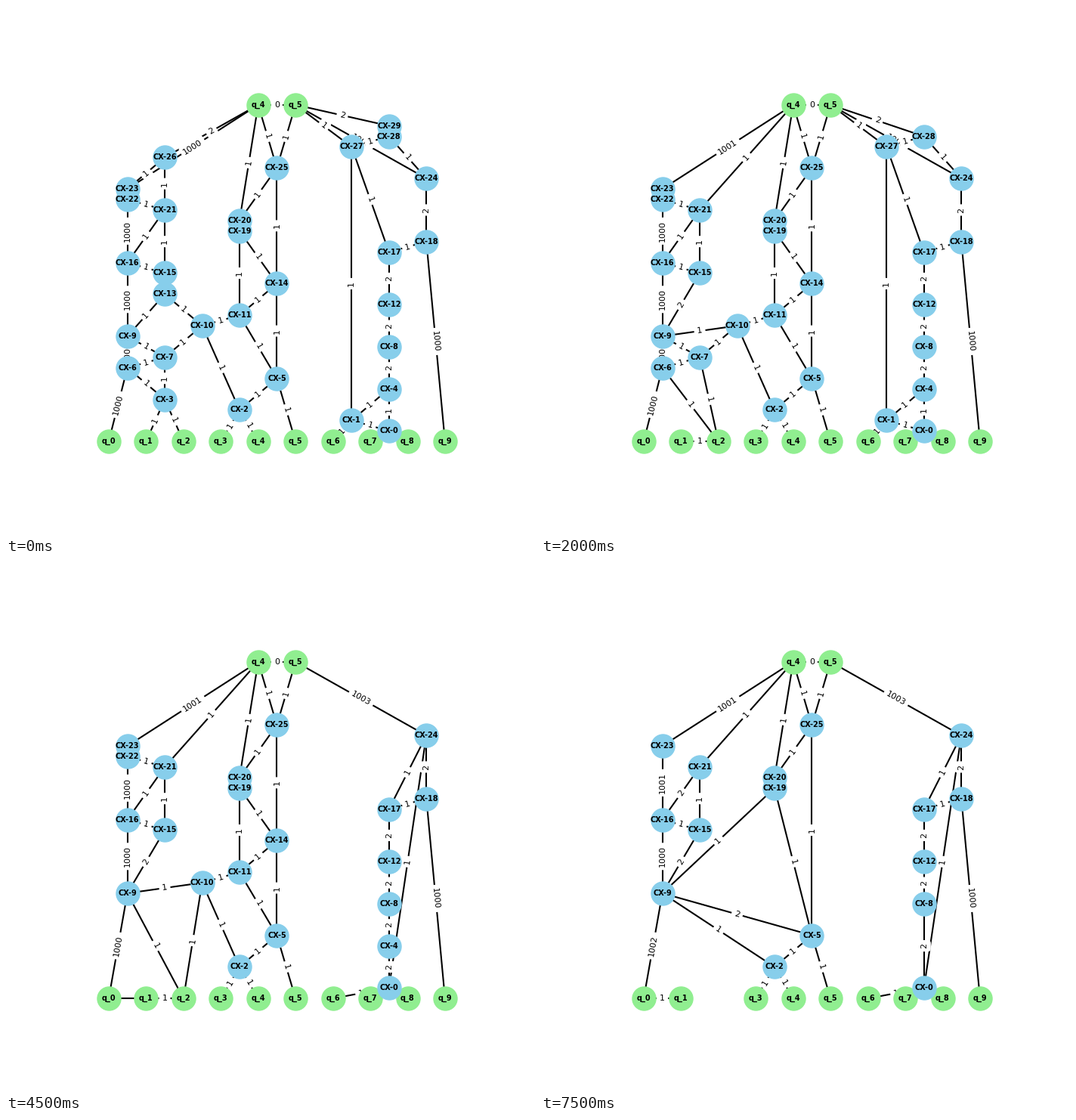
Write a matplotlib script that moves like this. It is 700 px wide and 700 px high and loops after 8 s.

```python
import math

import matplotlib.pyplot as plt
from matplotlib.animation import FuncAnimation
from matplotlib.collections import LineCollection

SIZE, DPI = 700, 100
STEP_MS = 500

# Left qubit of each two-qubit gate, from CX-0 upwards.
GATE_QUBITS = [int(c) for c in "763174017023714107833100841677"]
WIRES = 10
HEAVY = 1000

# Each step folds the first node into the second.
MERGES = [
    ("CX-3", "q_2"), ("CX-26", "t_4"), ("CX-29", "CX-28"),
    ("CX-13", "CX-9"), ("CX-1", "CX-0"), ("CX-6", "q_0"),
    ("CX-28", "CX-24"), ("CX-7", "q_2"), ("CX-27", "CX-24"),
    ("CX-10", "CX-9"), ("CX-11", "CX-9"), ("CX-14", "CX-5"),
    ("q_2", "q_0"), ("CX-22", "CX-16"), ("CX-4", "CX-0"),
]


def place(col, level):
    return 135.9 + 49.45 * col, 123.8 + 13.92 * level


def build_nodes():
    pos = {f"q_{i}": place(i, 0) for i in range(WIRES)}
    pos.update({f"t_{i}": place(i, 32) for i in (4, 5)})
    for k, q in enumerate(GATE_QUBITS):
        pos[f"CX-{k}"] = place(q + 0.5, k + 1)
    return pos


def add_edge(edges, u, v, weight):
    key = (v, u) if (v, u) in edges else (u, v)
    edges[key] = edges.get(key, 0) + weight


def build_edges():
    edges = {("t_4", "t_5"): 0}
    for w in reversed(range(WIRES)):
        gates = [f"CX-{k}" for k, q in enumerate(GATE_QUBITS) if w in (q, q + 1)]
        path = [f"q_{w}", *gates, "t_4" if w < 5 else "t_5"]
        last = len(path) - 2
        for i, (u, v) in enumerate(zip(path, path[1:])):
            heavy = w == 0 or (w == 9 and i in (0, last))
            add_edge(edges, u, v, HEAVY if heavy else 1)
    return edges


def contract(edges, gone, kept):
    out = {}
    for (u, v), weight in edges.items():
        u, v = (kept if n == gone else n for n in (u, v))
        if u != v:
            add_edge(out, u, v, weight)
    return out


def build_states():
    pos, edges = build_nodes(), build_edges()
    states = [(pos, edges)]
    for gone, kept in MERGES:
        pos = {n: p for n, p in pos.items() if n != gone}
        edges = contract(edges, gone, kept)
        states.append((pos, edges))
    return states


def label_angle(a, b):
    angle = math.degrees(math.atan2(b[1] - a[1], b[0] - a[0]))
    if angle > 90:
        return angle - 180
    return angle + 180 if angle <= -90 else angle


fig = plt.figure(figsize=(SIZE / DPI, SIZE / DPI), dpi=DPI, facecolor="white")
ax = fig.add_axes([0, 0, 1, 1])
states = build_states()
label_box = dict(boxstyle="round", ec="white", fc="white")


def draw(frame):
    pos, edges = states[frame]
    ax.clear()
    ax.set(xlim=(0, SIZE), ylim=(0, SIZE))
    ax.axis("off")

    lines = [(pos[u], pos[v]) for u, v in edges]
    ax.add_collection(LineCollection(lines, colors="black", linewidths=1.5, zorder=1),
                      autolim=False)
    for (a, b), weight in zip(lines, edges.values()):
        ax.text((a[0] + b[0]) / 2, (a[1] + b[1]) / 2, str(weight), size=8,
                ha="center", va="center", rotation=label_angle(a, b),
                rotation_mode="default", bbox=label_box, zorder=1)

    for is_gate, color in ((False, "lightgreen"), (True, "skyblue")):
        pts = [p for n, p in pos.items() if n.startswith("CX") == is_gate]
        ax.scatter(*zip(*pts), s=500, c=color, linewidths=1, zorder=2)
    for name, (x, y) in pos.items():
        ax.text(x, y, name.replace("t", "q"), size=7, weight="bold",
                ha="center", va="center", zorder=3)
    return []


anim = FuncAnimation(fig, draw, frames=len(states), init_func=lambda: draw(0),
                     interval=STEP_MS, repeat=True, repeat_delay=0)
plt.show()
```
